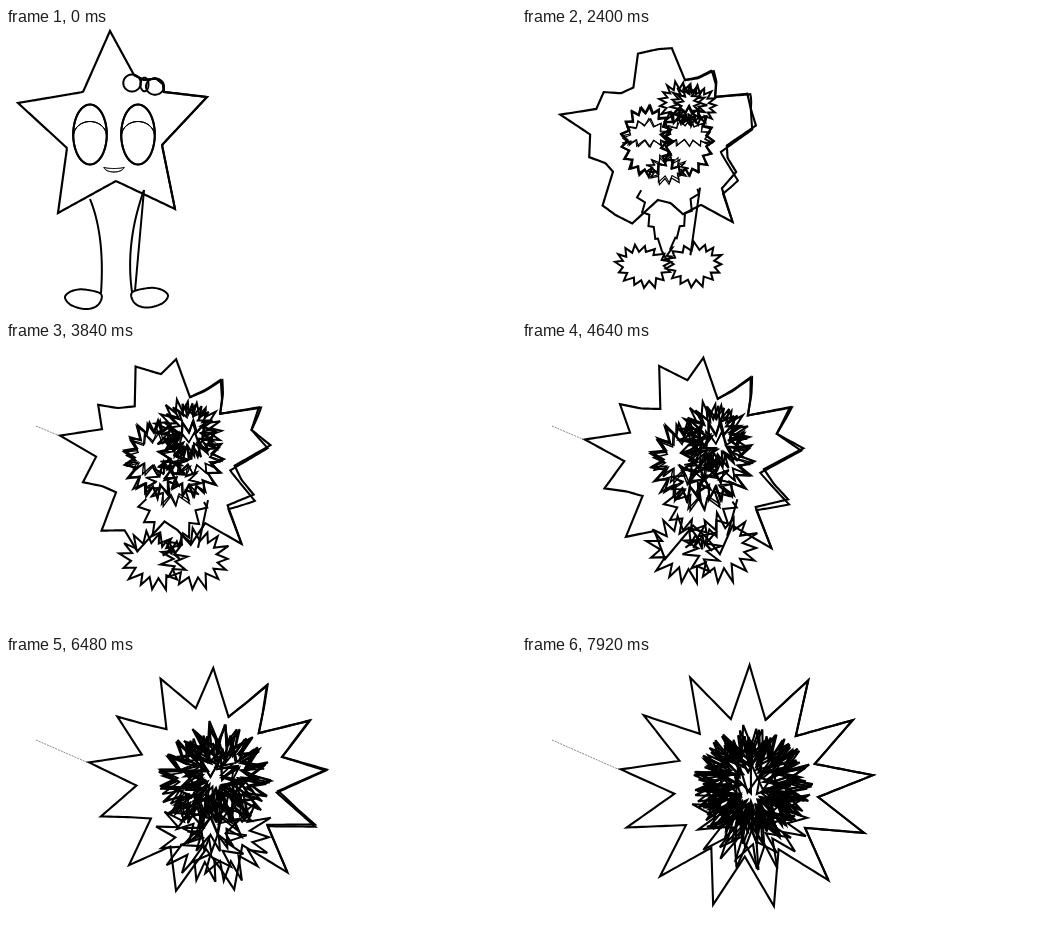
Animation of 510x286 px, one loop 8000 ms. Source, as an HTML page with a canvas:

```html
<!DOCTYPE html>
<html lang="en">
<head>
<meta charset="utf-8">
<title>Star morph</title>
<style>
html, body { margin: 0; width: 100%; height: 100%; overflow: hidden; background: #fff; }
canvas { display: block; }
</style>
</head>
<body>
<canvas id="stage" width="510" height="286"></canvas>
<script>
const ctx = document.getElementById('stage').getContext('2d');
const LOOP = 8000, STEP = 80, TAU = Math.PI * 2, SPIKES = 13;
const lerp = (a, b, k) => a + (b - a) * k;
const mix = (a, b, k) => [lerp(a[0], b[0], k), lerp(a[1], b[1], k)];

let seed = 7;
const random = () => (seed = seed * 16807 % 2147483647) / 2147483647;
const jitter = size => (random() - 0.5) * size;

// Curves take u from 0 to 1 and return a point
const oval = (cx, cy, rx, ry) => u => [cx + rx * Math.cos(TAU * u), cy + ry * Math.sin(TAU * u)];
const bend = (a, b, c) => u => mix(mix(a, b, u), mix(b, c, u), u);
// An arc drawn there and back, so that it can open into a ring
const lid = (cx, cy, rx, ry) => u =>
  [cx + rx * Math.cos(TAU * u), cy - ry * Math.abs(Math.sin(TAU * u))];

// Smooth closed curve through points
const loop = pts => u => {
  const n = pts.length, k = u * n, i = Math.floor(k), t = k - i;
  const [a, b, c, d] = [n - 1, 0, 1, 2].map(j => pts[(i + j + n) % n]);
  return [0, 1].map(j => b[j] + t / 2 * (c[j] - a[j] +
    t * (2 * a[j] - 5 * b[j] + 4 * c[j] - d[j] + t * (3 * (b[j] - c[j]) + d[j] - a[j]))));
};

// Even walk along a polyline
const walk = pts => u => {
  const gap = i => Math.hypot(pts[i + 1][0] - pts[i][0], pts[i + 1][1] - pts[i][1]);
  let total = 0, i = 0;
  for (let j = 0; j < pts.length - 1; j++) total += gap(j);
  let left = u * total;
  while (i < pts.length - 2 && left > gap(i)) left -= gap(i++);
  return mix(pts[i], pts[i + 1], left / gap(i));
};

// Outline of a star with n spikes, u in turns
function spiky(cx, cy, rx, ry, n, phase, inner, rough = 0) {
  const corners = Array.from({ length: 2 * n }, (_, i) => {
    const a = phase + Math.PI * (i + jitter(rough * 3)) / n;
    const r = (i % 2 ? inner : 1) * (1 + jitter(rough));
    return [cx + rx * r * Math.cos(a), cy + ry * r * Math.sin(a)];
  });
  return u => {
    const k = u * 2 * n, i = Math.floor(k + 1e-6);
    return mix(corners[i % (2 * n)], corners[(i + 1) % (2 * n)], k - i);
  };
}

const sample = (f, n) => Array.from({ length: n + 1 }, (_, i) => f(i / n));

const shapes = [];
const add = (from, to, closed, width = 2) => shapes.push({ from, to, closed, width });

function ring(curve, cx, cy, R, n, copies = 1, width = 2) {
  for (let i = 0; i < copies; i++) {
    const star = spiky(cx, cy, R, R, n, jitter(3 / n), 0.52, 0.16);
    add(sample(curve, n * 4), sample(star, n * 4), true, width);
  }
}

function leg(curve, star, u0, u1) {
  add(sample(curve, 24), sample(u => star(lerp(u0, u1, u)), 24), false);
}

// Body: each side of the first star spreads evenly over some edges of the last
const bodyStar = spiky(224.5, 131, 127, 122, SPIKES, -2.03, 0.57);
const sides = [
  [2, [[104, 3], [128, 47]]],
  [2, [[128, 47], [138, 52], [150, 50.5], [157, 56], [158, 64]]],
  [2, [[158, 64], [201, 69]]],
  [5, [[201, 69], [156, 117], [169, 181]]],
  [5, [[169, 181], [110, 153], [52, 185]]],
  [5, [[52, 185], [61, 120], [12, 75]]],
  [5, [[12, 75], [77, 64], [104, 3]]]
];
const outline = { from: [], to: [] }, echo = { from: [], to: [] };
function spread(into, [edges, pts], first, slip) {
  const along = walk(pts), n = edges * 12;
  into.from.push(...sample(u => along(u + slip * Math.sin(Math.PI * u)), n));
  into.to.push(...sample(u => bodyStar((first + edges * u) / (2 * SPIKES)), n));
}
let first = 1;
sides.forEach((side, i) => {
  spread(outline, side, first, 0);
  if (i > 0 && i < 4) spread(echo, side, first, 0.1);
  first += side[0];
});
add(outline.from, outline.to, true, 2.2);
add(echo.from, echo.to, false);

// Eyes and mouth
for (const [x, goal] of [[84, 219], [132, 241]]) {
  ring(oval(x, 106.5, 16.8, 30), goal, 128, 47, 17, 2);
  ring(lid(x, 108, 16.5, 14.5), goal, 130, 45, SPIKES, 2, 0.7);
}
ring(lid(108, 139, 10, -5), 230, 141, 46, SPIKES, 1, 0.8);
ring(lid(108, 139, 10, -1.5), 230, 141, 46, SPIKES, 1, 0.7);

// Bow
ring(oval(126, 55, 8.7, 8.5), 232, 121, 50, 17);
ring(oval(138.5, 56.5, 4, 6.8), 231, 122, 50, 17);
ring(oval(149, 58.5, 9, 8.2), 231, 122, 48, 17);

// Feet and legs
const foot = loop([[95, 266], [92, 277], [80, 281], [65, 277], [59, 269], [66, 263], [78, 261.5]]);
const otherFoot = u => {
  const [x, y] = foot((1.55 - u) % 1);
  return [221 - x, y - 1.5];
};
ring(foot, 222, 162, 51, 15);
ring(otherFoot, 238, 161, 51, 15);
leg(bend([84, 171], [99, 208], [95, 265]), spiky(226, 142, 46, 46, 15, 0, 0.56), 0.5, 0.1);
leg(bend([138, 162], [119, 215], [126, 264]), spiky(228, 146, 46, 46, 15, 0, 0.56), 0.05, 0.45);
add([[138, 162], [129, 263]], [[270, 154], [259, 145]], false);

function stroke(pts, width, closed) {
  ctx.beginPath();
  pts.forEach(p => ctx.lineTo(...p));
  if (closed) ctx.closePath();
  ctx.lineWidth = width;
  ctx.stroke();
}

function draw(now) {
  const t = Math.floor(now % LOOP / STEP) * STEP, p = t / (LOOP - STEP);
  ctx.fillStyle = '#fff';
  ctx.fillRect(0, 0, 510, 286);
  ctx.strokeStyle = '#000';
  ctx.miterLimit = 4;
  for (const s of shapes) {
    stroke(s.from.map((a, i) => mix(a, s.to[i], p)), lerp(s.width, 2.1, p), s.closed);
  }
  // Faint trail behind the left tip
  if (t > 2640) {
    ctx.strokeStyle = '#555';
    ctx.setLineDash([2, 1]);
    stroke([[30, 84], mix([12, 75], [98, 114], p)], 0.7);
    ctx.setLineDash([]);
  }
}

let start;
function tick(now) {
  start ??= now;
  draw(Math.max(0, now - start));
  requestAnimationFrame(tick);
}
requestAnimationFrame(tick);
</script>
</body>
</html>
```
